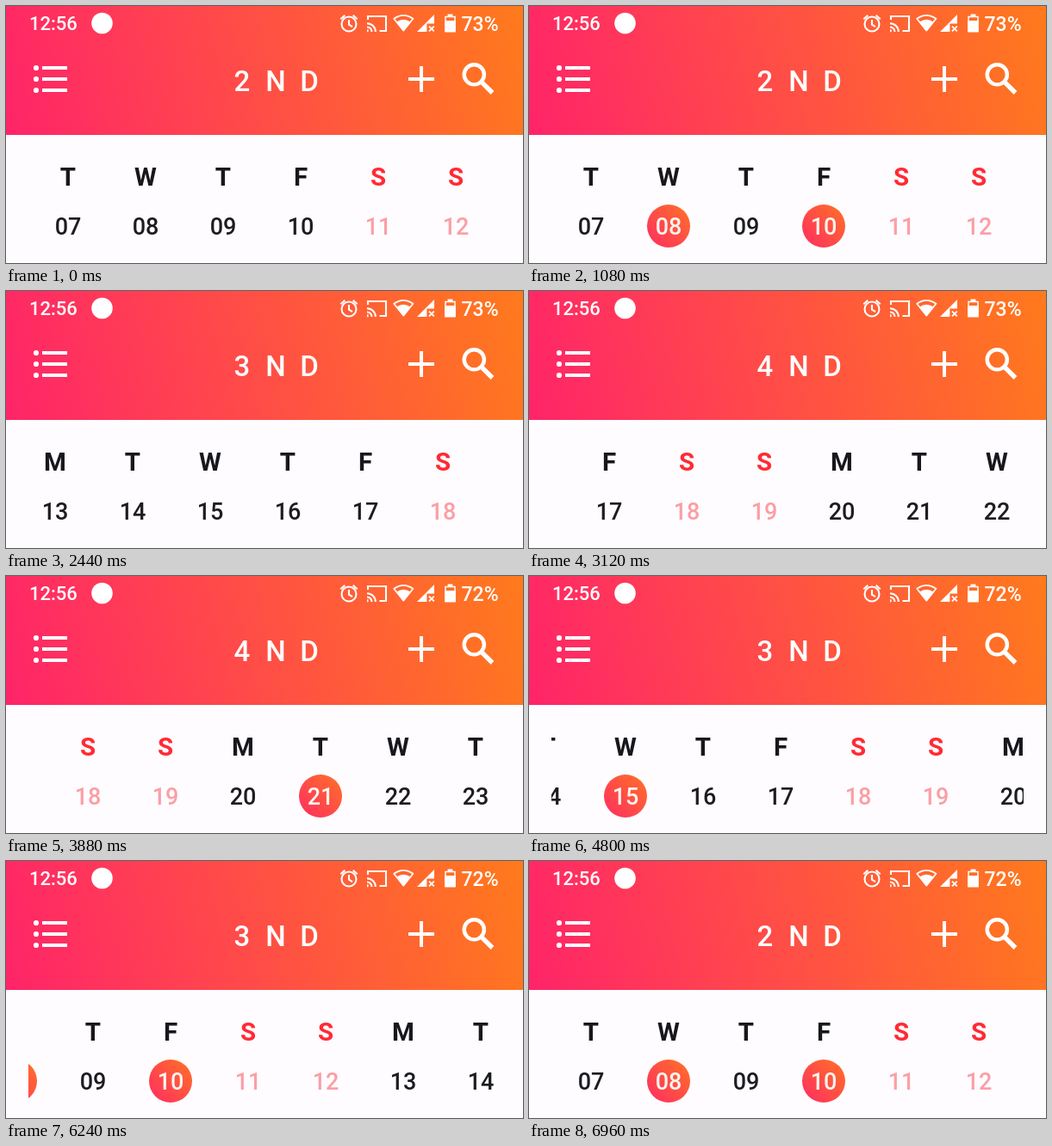
An HTML page for the animation above (7.36 s loop, 600 px wide and 299 px high).

```html
<!DOCTYPE html>
<html lang="en">
<head>
<meta charset="utf-8">
<title>Calendar strip</title>
<style>
  html, body { margin: 0; width: 100%; height: 100%; overflow: hidden; background: #fefcff; }
  svg { display: block; width: 600px; height: 299px; font-family: Roboto, sans-serif; }
  .status { font-weight: 500; fill: #fff; }
  .title { font-size: 33px; font-weight: 500; text-anchor: middle; fill: #fff; }
  .line { fill: none; stroke: #fff; }
  .day { text-anchor: middle; }
  .name { font-size: 29.5px; font-weight: 700; fill: #17171c; }
  .num { font-size: 27px; font-weight: 500; fill: #1c1c21; }
  .off .name { fill: #ff2b35; }
  .off .num { fill: #fb9fa4; }
  .on .num { fill: #fff3f0; }
</style>
</head>
<body>
<svg viewBox="0 0 600 299">
  <defs>
    <linearGradient id="bar" gradientUnits="userSpaceOnUse" x1="0" y1="150" x2="600" y2="0">
      <stop offset="0" stop-color="#ff2469"/>
      <stop offset=".5" stop-color="#ff4f45"/>
      <stop offset="1" stop-color="#ff7a1c"/>
    </linearGradient>
    <linearGradient id="dot" x1="0" y1="1" x2="1" y2="0">
      <stop offset="0" stop-color="#ff2c62"/>
      <stop offset="1" stop-color="#ff7226"/>
    </linearGradient>
    <clipPath id="window"><rect x="26" y="150" width="548" height="149"/></clipPath>
  </defs>
  <rect width="600" height="299" fill="#fefcff"/>
  <rect width="600" height="150" fill="url(#bar)"/>

  <g class="status">
    <text x="27" y="28" font-size="22">12:56</text>
    <text id="charge" x="528.5" y="28.5" font-size="23">73%</text>
  </g>
  <circle cx="111.5" cy="20" r="12.3" fill="#fff"/>

  <!-- alarm -->
  <g class="line" stroke-width="2.1">
    <circle cx="398" cy="21" r="8.5"/>
    <path d="M398 16v5.6l4 2.5M388.3 15.2l5-4.3M407.7 15.2l-5-4.3"/>
  </g>
  <!-- cast -->
  <g class="line" stroke-width="2.1">
    <path d="M420 16v-4h21v17h-7.5M419 20.2a9.8 9.8 0 0 1 9.8 9.8M419 24.5a5.5 5.5 0 0 1 5.5 5.5"/>
    <path d="M419 28.8h1.6" stroke-width="3"/>
  </g>
  <!-- wifi -->
  <path class="line" stroke-width="1.7" stroke-linejoin="round" d="M450.2 14.8Q461.3 6.8 472.4 14.8L461.3 28.6Z"/>
  <path fill="#fff" d="M453.2 18.4Q461.3 13 469.4 18.4L461.3 29Z"/>
  <!-- signal -->
  <path fill="#fff" d="M477 30L497 10v10.5h-8.6V30Z"/>
  <path class="line" stroke-width="1.9" d="M491 23.6l5.8 5.8M496.8 23.6l-5.8 5.8"/>
  <!-- battery -->
  <path class="line" stroke-width="1.5" d="M510 12.4h11v17.4h-11z"/>
  <path fill="#fff" d="M512.6 9.5h5.8v2.5h-5.8zM509.3 17h12.4v13h-12.4z"/>

  <!-- list, add, search -->
  <g fill="#fff">
    <circle cx="35" cy="72" r="3.1"/><circle cx="35" cy="85" r="3.1"/><circle cx="35" cy="98" r="3.1"/>
  </g>
  <path class="line" stroke-width="4" d="M42 72h29M42 85h29M42 98h29M467 85h30M482 70v30"/>
  <circle class="line" cx="543.3" cy="79.8" r="11.6" stroke-width="4.4"/>
  <path class="line" stroke-width="5.4" d="M551.5 88.2L564.5 101"/>

  <g class="title">
    <text id="week" x="274" y="99">2</text>
    <text x="313" y="99">N</text>
    <text x="352" y="99">D</text>
  </g>
  <g clip-path="url(#window)"><g id="strip"></g></g>
</svg>
<script>
const LOOP = 7360, STEP = 90, FIRST = 7, LAST = 26;
// a drag speeds up from start to release, then the fling slows down until stop
const swipes = [
  { start: 1210, release: 1640, stop: 2440, from: 0, mid: 289, to: 555 },
  { start: 2800, release: 3040, stop: 3480, from: 555, mid: 770, to: 967 },
  { start: 4330, release: 4800, stop: 5640, from: 967, mid: 680, to: 391 },
  { start: 5830, release: 6240, stop: 6960, from: 391, mid: 151, to: 0 }
];
const taps = { 8: 360, 10: 880, 15: 2600, 21: 3840 };

const byId = id => document.getElementById(id);
const strip = byId('strip'), week = byId('week'), charge = byId('charge');

function add(parent, tag, attrs, text) {
  const el = document.createElementNS('http://www.w3.org/2000/svg', tag);
  for (const key in attrs) el.setAttribute(key, attrs[key]);
  if (text) el.textContent = text;
  parent.appendChild(el);
  return el;
}

const days = [];
for (let n = FIRST; n <= LAST; n++) {
  const weekday = (n - 6) % 7;
  const x = 72 + (n - FIRST) * STEP;
  const g = add(strip, 'g', { class: weekday > 4 ? 'day off' : 'day' });
  const dot = add(g, 'circle', { cx: x, cy: 256, r: 25, fill: 'url(#dot)', opacity: 0 });
  add(g, 'text', { class: 'name', x, y: 209 }, 'MTWTFSS'[weekday]);
  add(g, 'text', { class: 'num', x, y: 266 }, String(n).padStart(2, '0'));
  if (taps[n]) days.push({ g, dot, at: taps[n] });
}

function scrollAt(t) {
  let pos = 0;
  for (const s of swipes) {
    if (t < s.start) break;
    if (t < s.release) {
      const u = (t - s.start) / (s.release - s.start);
      pos = s.from + (s.mid - s.from) * u * u;
    } else {
      const u = Math.min(1, (t - s.release) / (s.stop - s.release));
      pos = s.to + (s.mid - s.to) * (1 - u) ** 4;
    }
  }
  return Math.round(pos);
}

function draw(t) {
  const pos = scrollAt(t);
  strip.setAttribute('transform', `translate(${-pos} 0)`);
  // the heading follows the last day that is wholly in view
  week.textContent = pos < 83 ? '2' : pos < 713 ? '3' : '4';
  charge.textContent = t < 3240 ? '73%' : '72%';
  for (const d of days) {
    const on = t >= d.at;
    d.dot.setAttribute('opacity', !on ? 0 : t < d.at + 40 ? 0.5 : 1);
    d.g.classList.toggle('on', on);
  }
}

const begin = performance.now();
function tick() {
  const t = (performance.now() - begin) % LOOP;
  draw(Math.floor(t / 40) * 40);
  requestAnimationFrame(tick);
}
tick();
</script>
</body>
</html>
```
